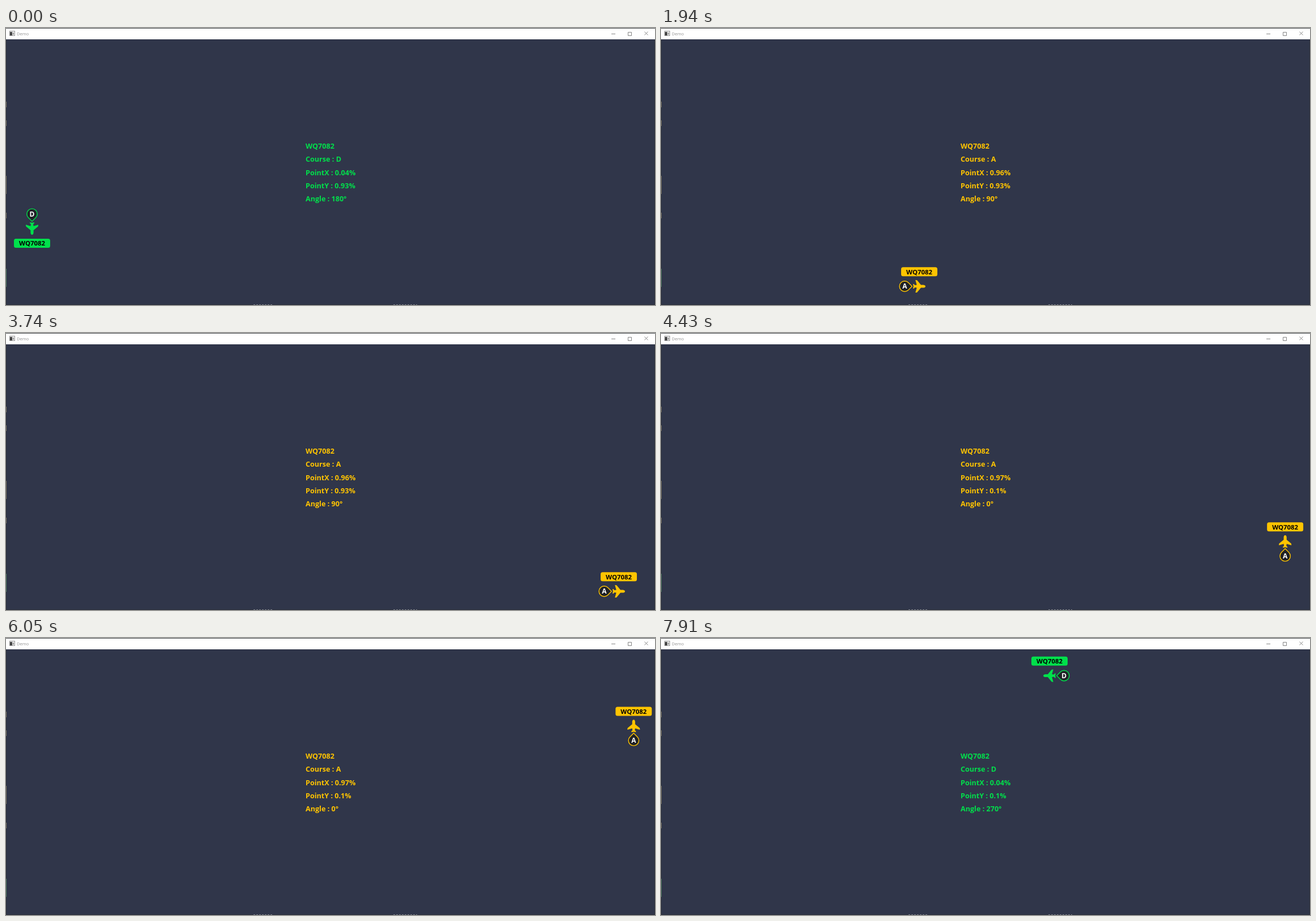
Animation, 1146 px wide and 489 px high, one loop 8000 ms. Source, as an HTML page:

```html
<!DOCTYPE html>
<html lang="en">
<head>
<meta charset="utf-8">
<title>Demo</title>
<style>
  html, body { margin: 0; height: 100%; overflow: hidden; background: #30364a; }
  svg { display: block; width: 1146px; height: 489px; font-family: "Open Sans", "Noto Sans", sans-serif; }
  .info { font-weight: 700; font-size: 12.6px; fill: currentColor; }
  .tag { font-weight: 700; font-size: 11.4px; text-anchor: middle; }
  .letter { font-weight: 700; font-size: 12px; text-anchor: middle; fill: #fff; }
</style>
</head>
<body>
<svg viewBox="0 0 1146 489">
  <rect width="1146" height="489" fill="#30364a"/>
  <rect width="1146" height="20" fill="#fff"/>
  <path d="M0 .5H1146" stroke="#4b4d50"/>
  <path d="M.5 20V489M1145.5 20V489" stroke="#292d38"/>
  <path d="M.5 130v10m0 23v10m0 88v32m0 33v10" stroke="#77705d"/>
  <path d="M.5 425v32" stroke="#4d7a5c"/>
  <path d="M0 488.5H1146" stroke="#2a2e39"/>
  <path d="M437 488.5h33M684 488.5h42" stroke="#80848c" stroke-dasharray="3 2"/>

  <rect x="6.5" y="5.5" width="9" height="8" fill="#eee" stroke="#999"/>
  <path d="M7 7h4v6H7z" fill="#444"/>
  <path d="M12 8h2v4h-2z" fill="#999"/>
  <text x="19" y="12.8" font-size="7.5" fill="#909090">Demo</text>
  <path d="M1069 10.5h7M1098.500 7.500h6v6h-6zM1127.500 6.500l6 6m0-6l-6 6" fill="none" stroke="#777" stroke-width=".9"/>

  <g id="scene">
    <g id="info"></g>
    <g id="marker">
      <g id="craft">
        <path fill="currentColor" d="M0-11C1.800-11 2.600-9 2.600-7V-3L10.500 3.600Q11.200 4.300 11 6.800L2.600 4.300 2 7.800 4 9.400V11L0 10.200-4 11V9.400L-2 7.800-2.600 4.300-11 6.800Q-11.200 4.300-10.500 3.600L-2.600-3V-7C-2.600-9-1.800-11 0-11z"/>
        <path fill="#202226" stroke="currentColor" stroke-width="1.400" d="M0 12.800L6.500 19.200A9.200 9.200 0 1 1-6.500 19.200z"/>
      </g>
      <text class="letter" id="letter"></text>
      <g id="label">
        <rect x="-32" y="-8" width="64" height="16" rx="3.500" fill="currentColor"/>
        <text class="tag" y="4.300">WQ7082</text>
      </g>
    </g>
  </g>
</svg>
<script>
const $ = id => document.getElementById(id);
const FLIGHT = 'WQ7082', LOOP = 8000, STEP = 77.55, LAST_STEP = 102;
const GREEN = '#00e04b', YELLOW = '#ffc400';

// Each path point is [step, x, y]; a leg begins at the step of its first point.
const legs = [
  { course: 'D', color: GREEN, px: 0.04, py: 0.93, angle: 180,
    path: [[0, 46, 354], [10, 46, 449]] },
  { course: 'A', color: YELLOW, px: 0.96, py: 0.93, angle: 90,
    path: [[11, 69, 456], [15, 181, 456], [22, 369, 456], [25, 456, 456],
           [33, 673, 456], [44, 972, 456], [48, 1082, 456]] },
  { course: 'A', color: YELLOW, px: 0.97, py: 0.1, angle: 0,
    path: [[49, 1100, 449], [55, 1101.5, 388], [66, 1105, 278],
           [67, 1105, 267.5], [77, 1108, 165.500], [86, 1111, 73]] },
  { course: 'D', color: GREEN, px: 0.04, py: 0.1, angle: 270,
    path: [[87, 1098.500, 66.500], [88, 1071, 66.500], [99, 768.500, 66.500], [102, 686, 66.500]] }
];

const lines = Array.from({ length: 5 }, (_, i) => {
  const text = document.createElementNS('http://www.w3.org/2000/svg', 'text');
  text.setAttribute('class', 'info');
  text.setAttribute('x', 529);
  text.setAttribute('y', 212.8 + i * 23.4);
  return $('info').appendChild(text);
});

const move = (el, x, y, turn = 0) =>
  el.setAttribute('transform', `translate(${x} ${y}) rotate(${turn})`);

function locate(path, step) {
  const next = Math.max(1, path.findIndex(p => p[0] >= step));
  const [s0, x0, y0] = path[next - 1], [s1, x1, y1] = path[next];
  const k = (step - s0) / (s1 - s0);
  return [x0 + (x1 - x0) * k, y0 + (y1 - y0) * k];
}

let shownLeg;
function showLeg(leg) {
  shownLeg = leg;
  const { course, color, px, py, angle } = leg;
  $('scene').style.color = color;
  [FLIGHT, `Course : ${course}`, `PointX : ${px}%`, `PointY : ${py}%`, `Angle : ${angle}°`]
    .forEach((s, i) => lines[i].textContent = s);
  const rad = angle * Math.PI / 180;
  move($('craft'), 0, 0, angle);
  $('letter').textContent = course;
  move($('letter'), -25.6 * Math.sin(rad), 25.6 * Math.cos(rad) + 4.4);
  move($('label'), 0, angle === 180 ? 26 : -25.8);
}

function frame(now) {
  const step = Math.min(LAST_STEP, Math.floor((now % LOOP + 14) / STEP));
  const leg = legs.findLast(l => l.path[0][0] <= step);
  if (leg !== shownLeg) showLeg(leg);
  move($('marker'), ...locate(leg.path, step));
  requestAnimationFrame(frame);
}
frame(0);
</script>
</body>
</html>
```
